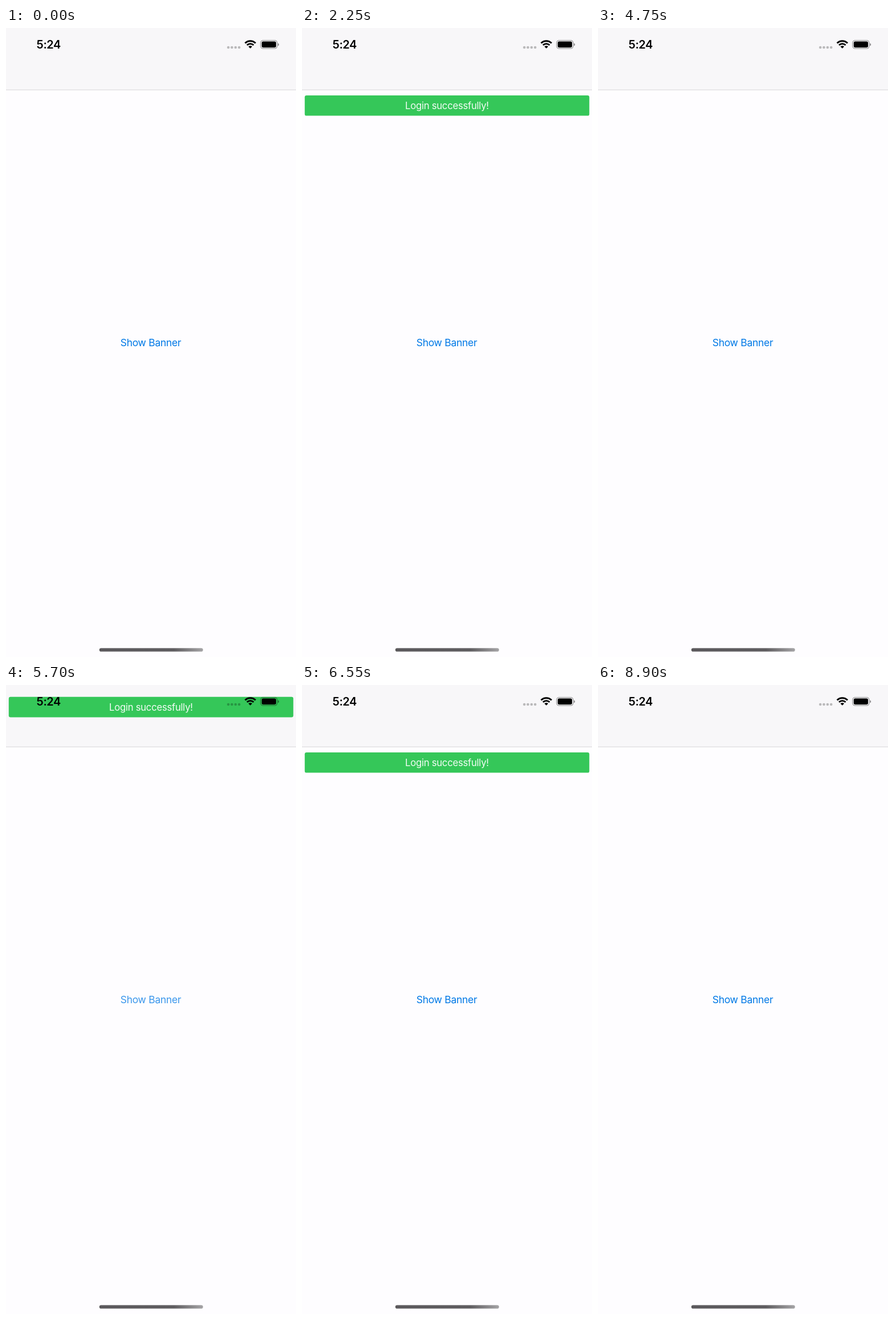
An HTML page for the animation above (8.95 s loop, 509 by 1101 pixels).

```html
<!DOCTYPE html>
<html lang="en">
<head>
<meta charset="utf-8">
<title>Banner demo</title>
<style>
  html, body { margin: 0; width: 100%; height: 100%; overflow: hidden; background: #fefdff; }
  svg { display: block; width: 100%; height: 100%; }
  text { font-family: Inter, Roboto, sans-serif; text-anchor: middle; }
</style>
</head>
<body>
<svg viewBox="0 0 509 1101">
  <defs>
    <linearGradient id="homeFill">
      <stop offset="0" stop-color="#5b595c"/>
      <stop offset=".72" stop-color="#5f5d60"/>
      <stop offset="1" stop-color="#a5a4a6"/>
    </linearGradient>
  </defs>
  <rect width="509" height="1101" fill="#fefdff"/>
  <rect width="509" height="108" fill="#f8f7f9"/>
  <rect y="107.8" width="509" height="1" fill="#d8d7d9"/>

  <text id="button" x="254" y="557" font-size="17.6" letter-spacing="-.35" fill="#0079e6">Show Banner</text>

  <g id="banner">
    <rect x="4.8" width="499.5" height="35.6" rx="3.2" fill="#35c759"/>
    <text x="254.4" y="23.8" font-size="16.8" letter-spacing="-.3" fill="#fff" fill-opacity=".94">Login successfully!</text>
  </g>

  <!-- Status bar stays above the banner -->
  <text x="74.8" y="36.2" font-size="20" font-weight="600" letter-spacing="-.4">5:24</text>
  <g fill-opacity=".25">
    <circle cx="390.2" cy="34" r="2.3"/>
    <circle cx="396.5" cy="34" r="2.3"/>
    <circle cx="402.9" cy="34" r="2.3"/>
    <circle cx="409.2" cy="34" r="2.3"/>
  </g>
  <g transform="translate(428.8 35.8)" fill="none" stroke="#000" stroke-width="2.9">
    <path d="M-9.2-9.2A13 13 0 0 1 9.2-9.2M-5.8-5.8A8.2 8.2 0 0 1 5.8-5.8"/>
    <path d="M0 0L-3.3-3.3A4.7 4.7 0 0 1 3.3-3.3Z" fill="#000" stroke="none"/>
  </g>
  <rect x="446.9" y="21.7" width="29" height="14.3" rx="4.2" fill="none" stroke="#000" stroke-opacity=".45" stroke-width="1.1"/>
  <rect x="448.8" y="23.5" width="25.2" height="10.7" rx="2.6"/>
  <path d="M477.4 26.4Q479.2 27.2 479.2 28.9T477.4 31.4Z" fill-opacity=".5"/>

  <rect x="163.8" y="1085.4" width="182" height="6.2" rx="3.1" fill="url(#homeFill)"/>
</svg>
<script>
const LOOP = 8950, STEP = 50;
const HIDDEN_Y = -40, SHOWN_Y = 118;
const taps = [
  { press: 1200, release: 1347, hide: 4400 },
  { press: 5450, release: 5631, hide: 8500 },
];
const banner = document.getElementById("banner");
const button = document.getElementById("button");

// Damped spring from 0 to 1, time in ms
function spring(ms) {
  const damping = 0.7, omega = 0.017;
  const ring = Math.sqrt(1 - damping * damping);
  const phase = omega * ring * ms;
  return 1 - Math.exp(-damping * omega * ms) * (Math.cos(phase) + damping / ring * Math.sin(phase));
}

// Cubic ease-in-out, control points (.42, 0) and (.58, 1)
function easeInOut(x) {
  let low = 0, high = 1;
  for (let i = 0; i < 20; i++) {
    const s = (low + high) / 2;
    const bezierX = 3 * s * (1 - s) ** 2 * 0.42 + 3 * s * s * (1 - s) * 0.58 + s ** 3;
    if (bezierX < x) low = s; else high = s;
  }
  return low * low * (3 - 2 * low);
}

function shownAmount(t, tap) {
  if (t < tap.release) return 0;
  if (t < tap.hide) return spring(t - tap.release);
  return 1 - easeInOut(Math.min(1, (t - tap.hide) / 300));
}

function buttonOpacity(t, tap) {
  if (t < tap.press) return 1;
  if (t < tap.release) return 0.2;
  return 1 - 0.8 * Math.exp((tap.release - t) / 56);
}

function draw(now) {
  const t = Math.floor(now % LOOP / STEP) * STEP;
  const tap = t < taps[1].press ? taps[0] : taps[1];
  const y = HIDDEN_Y + (SHOWN_Y - HIDDEN_Y) * shownAmount(t, tap);
  banner.setAttribute("transform", `translate(0 ${y.toFixed(2)})`);
  button.setAttribute("opacity", buttonOpacity(t, tap).toFixed(3));
}

const start = performance.now();
function tick() {
  draw(performance.now() - start);
  requestAnimationFrame(tick);
}
tick();
</script>
</body>
</html>
```
